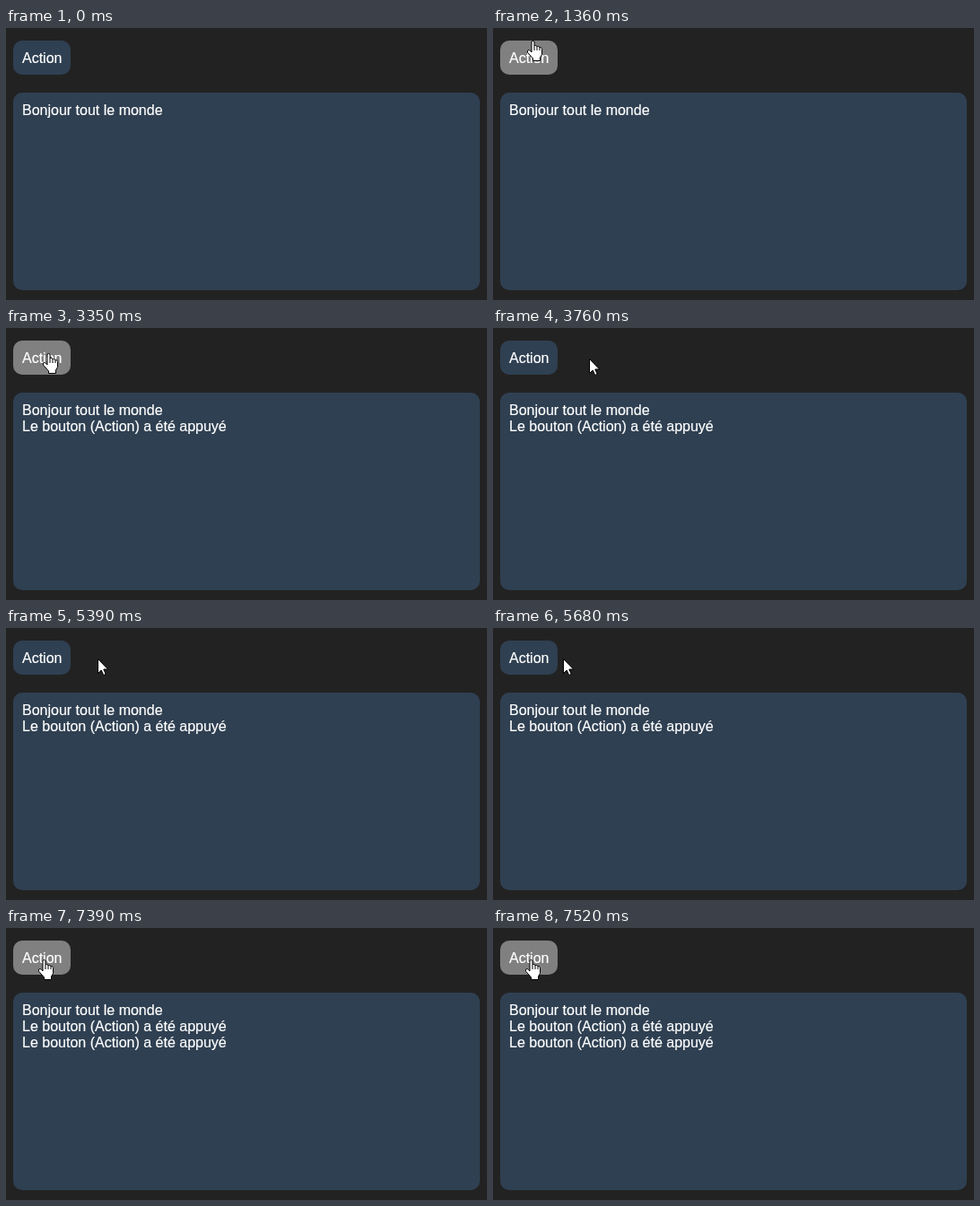
Recreate the animation shown at these times as an HTML page. Size 536 px wide and 303 px high, loop 8 s.

```html
<!DOCTYPE html>
<html lang="fr">
<head>
<meta charset="utf-8">
<title>Action</title>
<style>
  html, body { margin: 0; width: 100%; height: 100%; overflow: hidden; background: #222; }
  svg { display: block; width: 100%; height: 100%; }
  text { font: 16px "Liberation Sans", Arial, sans-serif; fill: #fff; stroke: #fff; stroke-width: .2; }
  .cursor { fill: #fff; stroke: #000; stroke-linejoin: round; }
</style>
</head>
<body>
<svg viewBox="0 0 536 303">
  <rect width="536" height="303" fill="#222"/>
  <rect id="button" x="8" y="14" width="64" height="38" rx="10"/>
  <text x="18" y="39">Action</text>
  <rect x="8" y="72" width="520" height="220" rx="10" fill="#2f4052"/>
  <text x="18" y="97">Bonjour tout le monde</text>
  <text x="18" y="115" class="log">Le bouton (Action) a été appuyé</text>
  <text x="18" y="133" class="log">Le bouton (Action) a été appuyé</text>
  <path id="arrow" class="cursor" d="M.5 .5V16.6L4.2 13l2.5 5.5 2.5-1.1L6.8 12h4.8z"/>
  <!-- fingertip at the group's origin -->
  <g id="hand" class="cursor">
    <path d="M-1 13V2Q-1 .5 .5 .5T2 2V6Q2.3 5.5 3.5 5.5T5 7Q5.3 6.5 6.5 6.5T8 8Q8.4 7.5 9.3 7.7T10.5 9.5V15.5L8.5 19V22.5H.5V20L-5.3 13.4Q-6.2 11.6-5 10.8T-2.5 11.5z"/>
    <path d="M2 6V11M5 7V11M8 8V11" fill="none"/>
  </g>
</svg>
<script>
const LOOP = 8000;
const CLICKS = [2480, 7390];

// each leg moves the pointer evenly, in held steps
const LEGS = [
  { start: 500, end: 760, steps: 2, from: [44, -13], to: [44, 1] },
  { start: 1070, end: 1910, steps: 6, from: [44, 6], to: [43, 29] },
  { start: 3350, end: 3760, steps: 3, from: [47, 28], to: [107, 34] },
  { start: 5390, end: 6070, steps: 5, from: [102, 34], to: [42, 35] }
];

const byId = id => document.getElementById(id);
const button = byId("button"), arrow = byId("arrow"), hand = byId("hand");
const logs = document.querySelectorAll(".log");
const show = (el, on) => el.setAttribute("visibility", on ? "visible" : "hidden");

function pointerAt(t) {
  const leg = LEGS.filter(l => l.start <= t).pop();
  if (!leg) return null;
  const raw = Math.min(1, (t - leg.start) / (leg.end - leg.start));
  const p = Math.floor(raw * leg.steps + 0.08) / leg.steps;
  return leg.from.map((a, i) => Math.round(a + (leg.to[i] - a) * p));
}

const inButton = ([x, y]) => x >= 8 && x < 72 && y >= 14 && y < 52;

function draw(t) {
  const pos = pointerAt(t);
  const over = pos !== null && inButton(pos);
  button.setAttribute("fill", over ? "#808080" : "#2f4052");
  show(arrow, pos && !over);
  show(hand, over);
  if (pos) (over ? hand : arrow).setAttribute("transform", `translate(${pos})`);
  logs.forEach((line, i) => show(line, t >= CLICKS[i]));
}

const start = performance.now();
function tick() {
  draw((performance.now() - start) % LOOP);
  requestAnimationFrame(tick);
}
tick();
</script>
</body>
</html>
```
